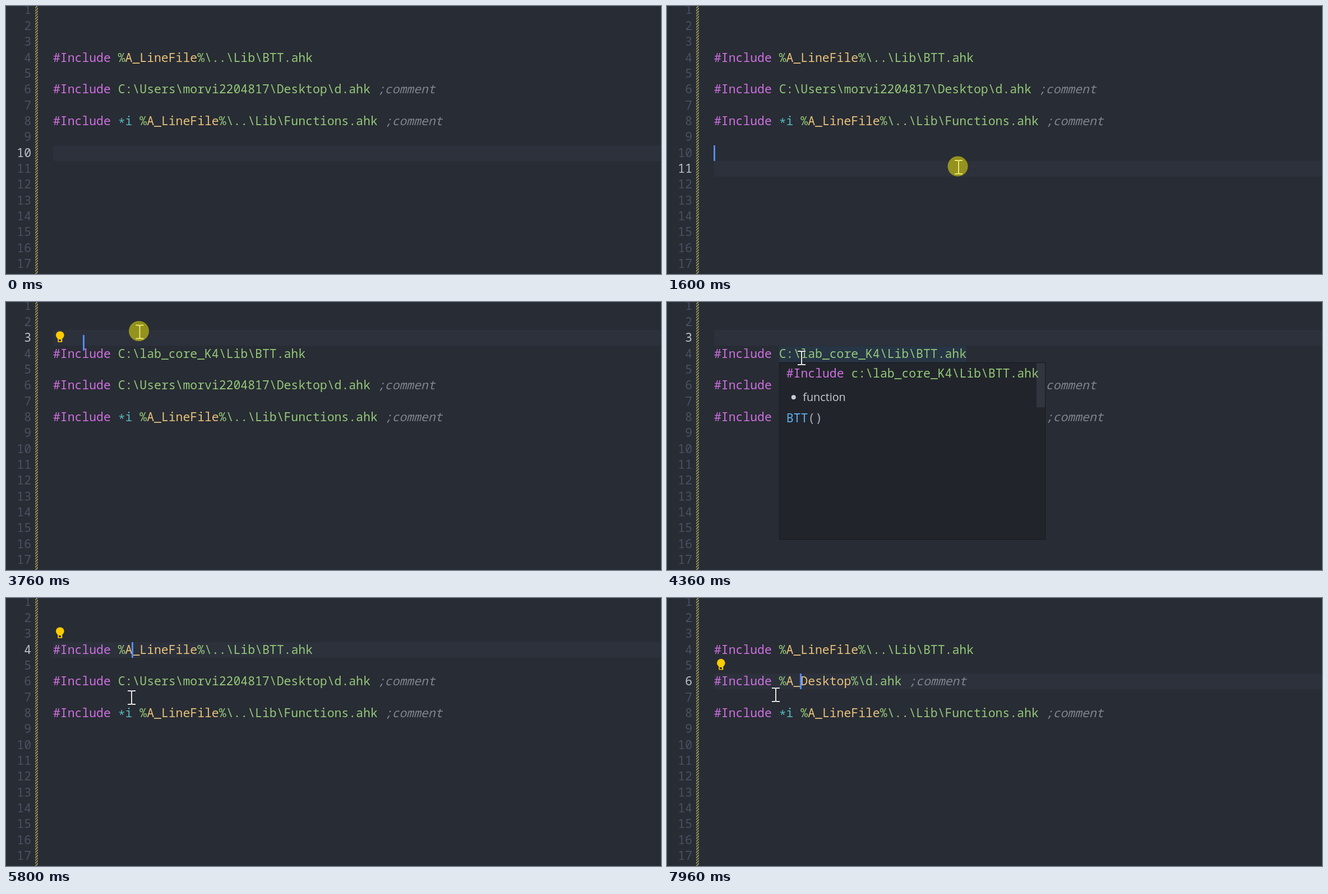
An HTML page with a canvas for the animation above (8 s loop, 1168 by 479 pixels).

```html
<!DOCTYPE html>
<html lang="en">
<head>
<meta charset="utf-8">
<title>Include paths</title>
<style>
  html, body { margin: 0; width: 100%; height: 100%; overflow: hidden; background: #282c34; }
  canvas { display: block; }
</style>
</head>
<body>
<canvas id="stage" width="1168" height="479"></canvas>
<script>
const ctx = document.getElementById('stage').getContext('2d');
const LOOP = 8000, W = 1168, H = 479;
const LEFT = 84, CHAR = 12.86, ROW = 28.35;
const MONO = '500 21.43px "Noto Sans Mono", monospace';
const SANS = '19.8px "Open Sans", sans-serif';
const APPLY = 200;             // delay from menu choice to new text
const ARRIVE = 80, LEAVE = 160; // pointer rest before and after a stop

const lineTop = n => 78.5 + (n - 4) * ROW;
const lineAt = y => Math.floor((y - lineTop(0)) / ROW);
const colX = c => LEFT + c * CHAR;
const clamp = v => Math.max(0, Math.min(1, v));
const mix = (a, b, k) => a + (b - a) * k;

// Pointer stops: time, x, y and the kind of click made there
const stops = [
  [0, 470, 170], [480, 304, 201], [760, 304, 201], [1160, 430, 140],
  [1600, 520, 288, 'edit'], [2080, 265, 90, 'edit'],
  [2760, 101, 74, 'bulb'], [3220, 170, 150, 'pick'],
  [3707, 238.5, 53.5, 'edit'], [4100, 240, 100], [4420, 240, 100, 'edit'],
  [5080, 105, 70, 'bulb'], [5440, 215, 188, 'pick'], [5760, 224, 178],
  [6100, 253, 150, 'edit'], [6600, 755, 150],
  [7040, 97, 125, 'bulb'], [7500, 205, 218, 'pick'], [8040, 194, 173]
];
const picks = stops.filter(s => s[3] === 'pick');
const lastClick = (kind, t) => stops.findLast(s => s[3] === kind && s[0] <= t);

const options = {
  4: ['%A_LineFile%\\..\\Lib\\BTT.ahk', 'C:\\lab_core_K4\\Lib\\BTT.ahk'],
  6: ['C:\\Users\\morvi2204817\\Desktop\\d.ahk', '%A_Desktop%\\d.ahk']
};

function linesAt(t) {
  const done = picks.filter(p => t >= p[0] + APPLY).length;
  return {
    4: '#Include ' + options[4][done === 1 ? 1 : 0],
    6: '#Include ' + options[6][done < 3 ? 0 : 1] + ' ;comment',
    8: '#Include *i %A_LineFile%\\..\\Lib\\Functions.ahk ;comment'
  };
}

// An edit click places the caret; a menu choice moves it one column left
const carets = [{ t: 0, line: 10, col: 0 }];
for (const [t, x, y, kind] of stops) {
  const line = lineAt(y), prev = carets.at(-1);
  if (kind === 'edit')
    carets.push({ t, line, col: linesAt(t)[line] ? Math.round((x - LEFT) / CHAR) : 0 });
  if (kind === 'pick')
    carets.push({ t: t + APPLY, line: prev.line, col: prev.col - 1, picked: true });
}

const tokens = [
  [/^#Include/, '#ce70e0'],
  [/^\*/, '#56b6c2', 4],
  [/^i(?= )/, '#56b6c2'],
  [/^A_[A-Za-z]+/, '#e9c27a'],
  [/^;.*/, '#7f848e'],
  [/^\w+(?=\(\))/, '#61afef'],
  [/^\(\)/, '#abb2bf'],
  [/^[\w:]+|^./, '#94c878']
];

function text(s, x, y, color, font = MONO, align = 'left') {
  ctx.font = font;
  ctx.textAlign = align;
  ctx.fillStyle = color;
  ctx.fillText(s, x, y);
}

function code(s, x, y) {
  while (s) {
    const [re, color, dy = 0] = tokens.find(([r]) => r.test(s));
    const word = s.match(re)[0];
    text(word, x, y + dy, color, (word[0] === ';' ? 'italic ' : '') + MONO);
    x += word.length * CHAR;
    s = s.slice(word.length);
  }
}

function box(x, y, w, h, fill, stroke) {
  [x, y, w, h] = [x, y, w, h].map(Math.round);
  ctx.fillStyle = fill;
  ctx.fillRect(x, y, w, h);
  if (!stroke) return;
  ctx.strokeStyle = stroke;
  ctx.lineWidth = 1;
  ctx.strokeRect(x + .5, y + .5, w - 1, h - 1);
}

function disc(x, y, r, color) {
  ctx.fillStyle = color;
  ctx.beginPath();
  ctx.arc(x, y, r, 0, 7);
  ctx.fill();
}

function gutter(active) {
  ctx.save();
  ctx.beginPath();
  ctx.rect(52, 0, 5, H);
  ctx.clip();
  ctx.strokeStyle = '#a49c58';
  ctx.lineWidth = 1.7;
  ctx.beginPath();
  for (let y = 0; y < H + 8; y += 4.9) {
    ctx.moveTo(51, y);
    ctx.lineTo(58, y - 7);
  }
  ctx.stroke();
  ctx.restore();
  for (let n = 1; n <= 17; n++)
    text(n, 45, lineTop(n) + 21, n === active ? '#bcc2cd' : '#495162', MONO, 'right');
}

// Marks every occurrence of the word under the caret
function wordMarks(lines, { line, col }) {
  const words = s => [...s.matchAll(/\w+/g)];
  const hit = words(lines[line]).find(m => m.index <= col && col <= m.index + m[0].length);
  if (!hit) return;
  for (const n in lines)
    for (const m of words(lines[n]))
      if (m[0] === hit[0])
        box(colX(m.index), lineTop(n), m[0].length * CHAR, ROW, '#484e5b', '#7f848e');
}

function bulb(line) {
  const y = lineTop(line) + 11.5;
  disc(96.3, y - 2.2, 7.3, '#ffcc00');
  ctx.fillRect(92.3, y + 2, 8, 8);
  box(94.3, y + 5.3, 4, 2.6, '#282c34');
}

function hover(t, from, to, line, col, file, names) {
  if (t < from || t >= to) return;
  const x = colX(col), y = lineTop(line + 1) + 1.5, h = 317;
  const head = '#Include c:\\lab_core_K4\\Lib\\' + file;
  const w = head.length * CHAR + 25;
  ctx.save();
  ctx.globalAlpha = clamp((t - from) / 100);
  box(x, y, w, h, '#21252b', '#181a1f');
  ctx.beginPath();
  ctx.rect(x, y, w, h);
  ctx.clip();
  box(x + w - 16, y + 1, 15, 79, '#30353f');
  code(head, x + 13, y + 26.5);
  disc(x + 26, y + 62, 4, '#c8ccd4');
  text('function', x + 42.5, y + 69, '#c8ccd4', SANS);
  names.forEach((n, i) => code(n + '()', x + 13, y + 107 + i * ROW));
  ctx.restore();
}

function menu(t, line) {
  const opened = lastClick('bulb', t)?.[0];
  const closed = picks.find(p => p[0] > opened)?.[0];
  if (!(t > opened + 60 && t < closed + 40)) return;
  const rows = options[line], longest = Math.max(...rows.map(r => r.length));
  const y = lineTop(line) + 1;
  box(97, y, longest * CHAR + 55, 140, '#21252b', '#181a1f');
  rows.forEach((r, i) => code(r, 124, y + 52 + i * 48));
}

function caret(t, i) {
  const a = carets[i - 1], b = carets[i];
  if (!a || (t - b.t) % 1000 >= 500) return;
  const k = clamp((t - b.t) / 80);
  box(colX(mix(a.col, b.col, k)) - 1.5, lineTop(mix(a.line, b.line, k)), 3, ROW, '#528bff');
}

function pointerAt(t) {
  const i = Math.max(1, stops.findIndex(s => s[0] - ARRIVE > t - ARRIVE - LEAVE && s[0] + LEAVE > t));
  const [t0, x0, y0] = stops[i - 1], [t1, x1, y1] = stops[i];
  const k = clamp((t - t0 - LEAVE) / (t1 - ARRIVE - t0 - LEAVE));
  const ease = k * k * (3 - 2 * k);
  return [mix(x0, x1, ease), mix(y0, y1, ease)];
}

const beam = new Path2D('M-7-12h5q2 0 2 2q0-2 2-2h5M0-10v20M-7 12h5q2 0 2-2q0 2 2 2h5');

function pointer(t) {
  if (t < 40) return;
  ctx.save();
  ctx.translate(...pointerAt(t));
  ctx.strokeStyle = 'rgba(20,22,26,.6)';
  ctx.lineWidth = 3.6;
  ctx.stroke(beam);
  ctx.strokeStyle = '#e8e8e8';
  ctx.lineWidth = 2;
  ctx.stroke(beam);
  const click = stops.findLast(s => s[3] && s[0] <= t);
  if (click) {
    ctx.globalAlpha = .53 * clamp((click[0] + 200 - t) / 60);
    disc(-1.5, -1.5, 18, '#f0ea08');
  }
  ctx.restore();
}

function draw(t) {
  const i = carets.findLastIndex(c => c.t <= t), now = carets[i];
  const lines = linesAt(t);
  box(0, 0, W, H, '#282c34');
  box(LEFT, lineTop(now.line), W - LEFT, ROW, '#2c313c');
  gutter(now.line);

  const link = (from, to, line, col, len) => {
    if (t >= from && t < to) box(colX(col), lineTop(line), len * CHAR, ROW, 'rgba(38,79,120,.25)');
  };
  link(685, 1240, 8, 12, 33);
  link(4260, 4420, 4, 9, 26);

  const settled = t - now.t > 270;
  if (settled && lines[now.line] && !now.picked) wordMarks(lines, now);
  for (const n in lines) code(lines[n], LEFT, lineTop(n) + 21);

  // The bulb lags behind the caret
  const lamp = settled || now.picked ? now : t - now.t < 120 && carets[i - 1];
  if (lamp && lines[lamp.line]) bulb(lamp.line - 1);
  caret(t, i);

  hover(t, 685, 1240, 8, 12, 'Functions.ahk',
    ['Functions', 'IfBetween', 'IfNotBetween', 'IfIn', 'IfNotIn', 'IfContains']);
  hover(t, 4260, 4420, 4, 9, 'BTT.ahk', ['BTT']);
  menu(t, now.line);
  pointer(t);
}

const start = performance.now();
function tick() {
  draw((performance.now() - start) % LOOP);
  requestAnimationFrame(tick);
}
tick();
</script>
</body>
</html>
```
